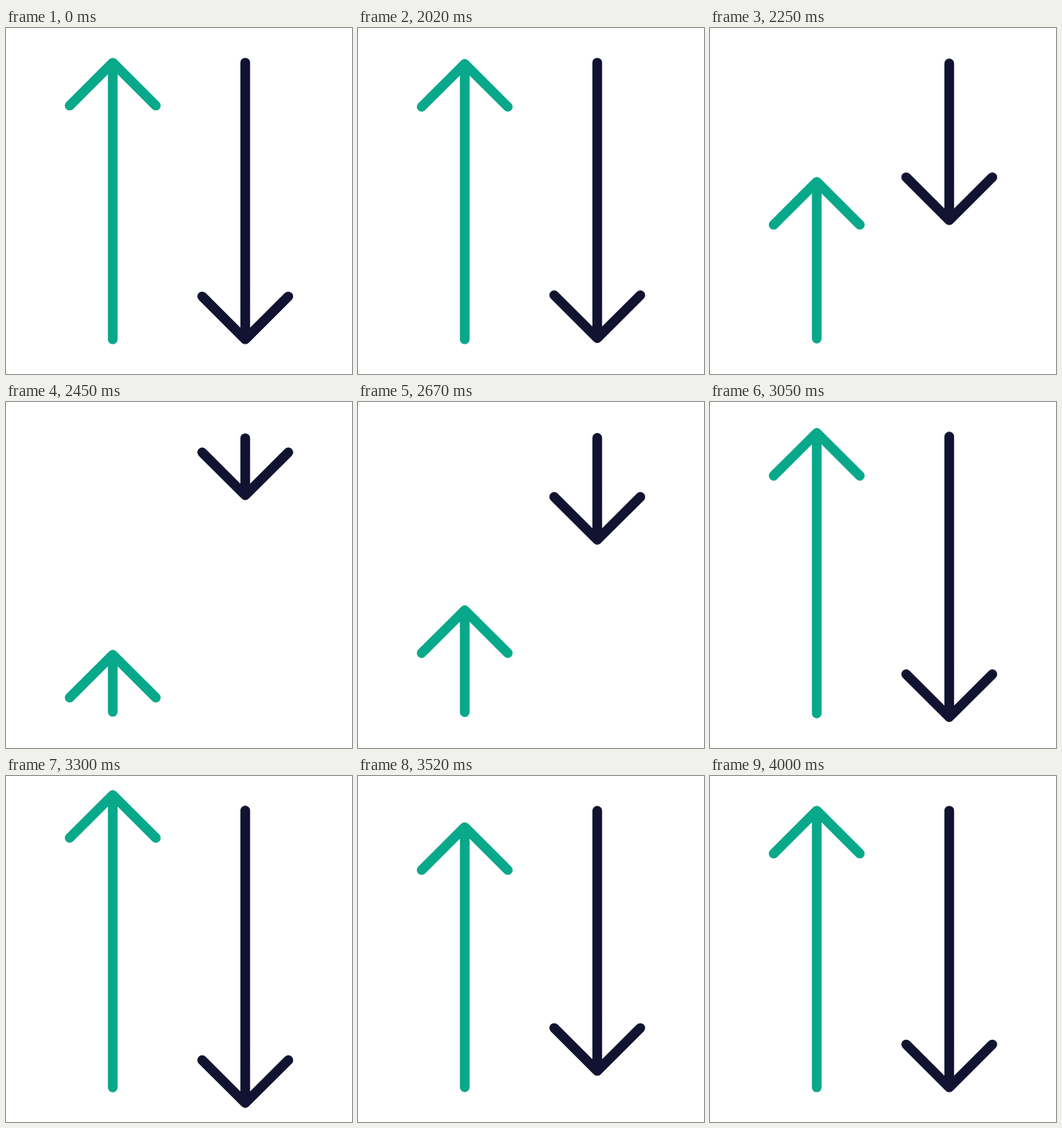
An HTML page that plays this animation: 400 px wide and 400 px high, repeating every 4020 ms.

```html
<!DOCTYPE html>
<html>
<head>
<meta charset="utf-8">
<style>
  html, body { margin: 0; width: 100%; height: 100%; overflow: hidden; background: #fff; }
  svg { display: block; width: 100%; height: 100%; }
  path { fill: none; stroke-width: 11.2; stroke-linecap: round; stroke-linejoin: round; }
</style>
</head>
<body>
<svg viewBox="0 0 400 400">
  <path stroke="#08a88a"/>
  <path stroke="#121331" transform="rotate(180 200 200)"/>
</svg>
<script>
  const LOOP = 4020;
  const arrows = document.querySelectorAll('path');
  // [time in ms, height of the arrow tip]
  const keys = [[0, 40], [2000, 40], [2475, 294], [3182, 10], [3560, 60.5], [4000, 40], [LOOP, 40]];
  const ease = u => u * u * (3 - 2 * u);

  function tipAt(t) {
    const i = keys.findIndex(k => k[0] > t);
    const [t0, y0] = keys[i - 1], [t1, y1] = keys[i];
    return y0 + (y1 - y0) * ease((t - t0) / (t1 - t0));
  }

  function draw() {
    const tip = tipAt(performance.now() % LOOP);
    const tail = 360 - (tip - 40) * 0.007;
    const wing = tip + 49.7;
    const d = `M123.4 ${tail}V${tip}M73.6 ${wing}L123.4 ${tip}L173.2 ${wing}`;
    arrows.forEach(a => a.setAttribute('d', d));
    requestAnimationFrame(draw);
  }
  draw();
</script>
</body>
</html>
```
